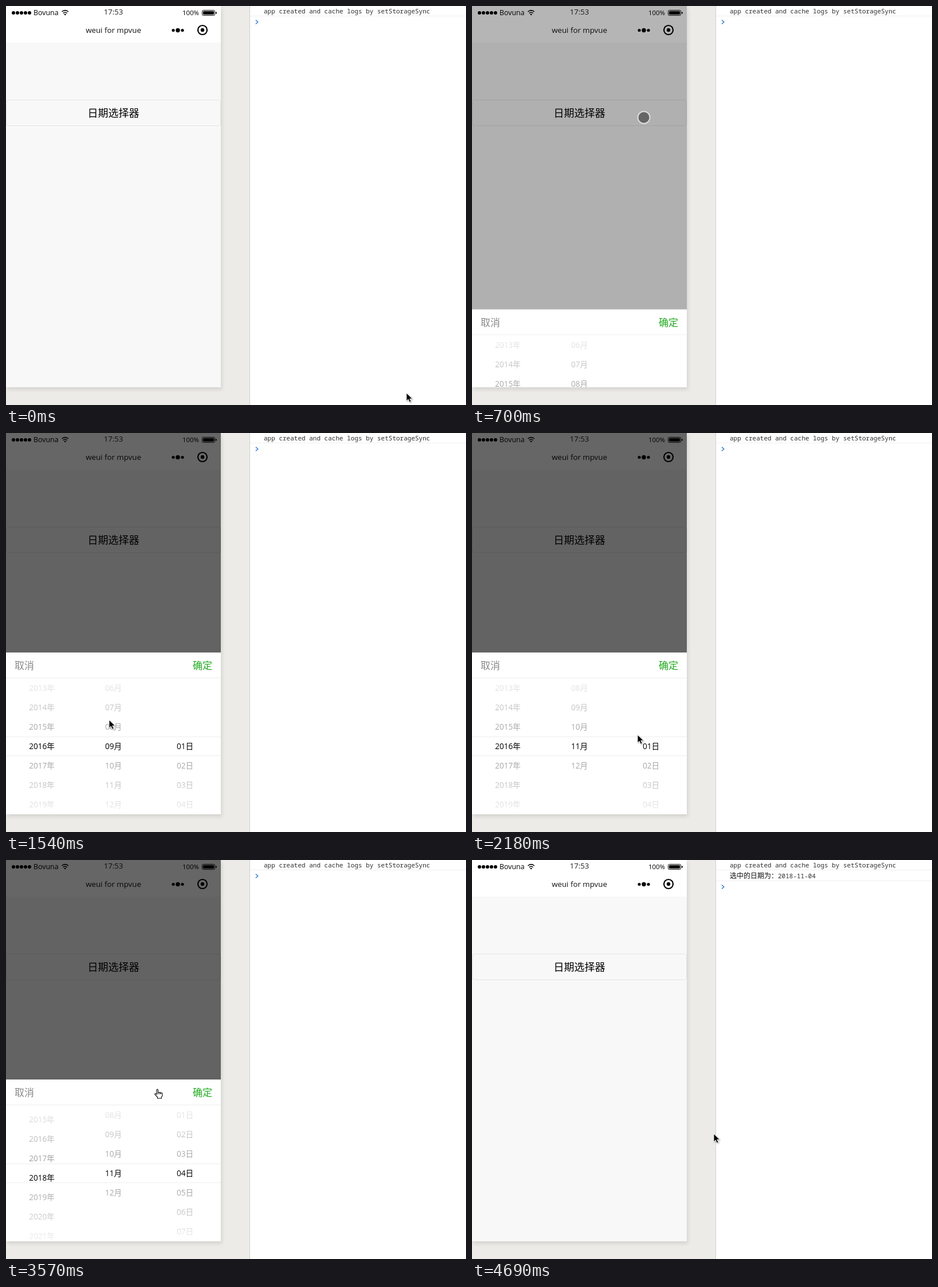
Recreate the animation shown at these times as an HTML page. Size 803x698 px, loop 4.76 s.

```html
<!DOCTYPE html>
<html lang="zh-CN">
<head>
<meta charset="utf-8">
<title>Date picker</title>
<style>
  html, body { margin: 0; width: 100%; height: 100%; overflow: hidden; background: #ecebe7; }
  svg { display: block; font-family: "Open Sans", "Noto Sans CJK SC", "Noto Sans CJK", sans-serif; }
  .mid { text-anchor: middle; }
  .log { font: 11px "Noto Sans Mono", "DejaVu Sans Mono", monospace; fill: #303030; }
  .cjk { font: 12px "Noto Sans CJK SC", "Noto Sans CJK", sans-serif; fill: #111; }
  .line { stroke: #eee; }
  #shadow { filter: drop-shadow(2px 4px 3px rgba(0, 0, 0, .1)); }
  #arrow { filter: drop-shadow(1px 1px 1px rgba(0, 0, 0, .35)); }
</style>
</head>
<body>
<svg width="803" height="698" viewBox="0 0 803 698">
  <defs>
    <clipPath id="screen"><path d="M0 0h375v667H0z"/></clipPath>
    <clipPath id="wheel"><path d="M0 429h375v238H0z"/></clipPath>
    <linearGradient id="fadeTop" x2="0" y2="1">
      <stop stop-color="#fff" stop-opacity=".95"/><stop offset="1" stop-color="#fff" stop-opacity=".6"/>
    </linearGradient>
    <linearGradient id="fadeEnd" x2="0" y2="1">
      <stop stop-color="#fff" stop-opacity=".6"/><stop offset="1" stop-color="#fff" stop-opacity=".95"/>
    </linearGradient>
  </defs>

  <!-- console -->
  <path d="M426 0h377v698H426z" fill="#fff"/>
  <path d="M425.5 0v698" stroke="#d0d0d0"/>
  <path d="M426 17.5h377" stroke="#f0f0f0"/>
  <text class="log" x="450" y="13">app created and cache logs by setStorageSync</text>
  <g id="result">
    <text class="cjk" x="450" y="32">选中的日期为：</text>
    <text class="log" x="534" y="32">2018-11-04</text>
    <path d="M426 36.5h377" stroke="#f0f0f0"/>
  </g>
  <path id="prompt" d="M436 24.5l3.7 3.5-3.7 3.5" fill="none" stroke="#3b82f0" stroke-width="1.6"/>

  <!-- phone -->
  <path id="shadow" d="M0 0h375v667H0z" fill="#f8f8f8"/>
  <g clip-path="url(#screen)">
    <path d="M0 0h375v64H0z" fill="#fff"/>
    <path d="M13 12h28.1" stroke="#000" stroke-width="6" stroke-linecap="round" stroke-dasharray="0 7"/>
    <text x="48" y="15.5" font-size="12.4">Bovuna</text>
    <path d="M97.5 10q5.7-4.6 11.4 0M99.7 12.7q3.5-2.8 7 0" fill="none" stroke="#000" stroke-width="1.6"/>
    <path d="M101.2 14.4q2-1.4 4 0l-2 2.2z"/>
    <text class="mid" x="187.5" y="15" font-size="13.2" fill="#222">17:53</text>
    <text x="308" y="16" font-size="11.4">100%</text>
    <rect x="342.5" y="7.5" width="22" height="9" rx="2" fill="none" stroke="#000"/>
    <rect x="344" y="9" width="19" height="6" rx="1"/>
    <path d="M366 10q2 .3 2 2t-2 2z"/>
    <text class="mid" x="187.5" y="47" font-size="13.3" fill="#111">weui for mpvue</text>
    <circle cx="292" cy="42.5" r="2.6"/><circle cx="300" cy="42.5" r="3.7"/><circle cx="308" cy="42.5" r="2.6"/>
    <circle cx="343" cy="42" r="8" fill="none" stroke="#000" stroke-width="2.2"/>
    <circle cx="343" cy="42" r="3.2"/>
    <rect id="button" x=".5" y="164.5" width="374" height="45" rx="4" stroke="#e4e4e4"/>
    <text class="mid" x="187.5" y="194" font-size="18">日期选择器</text>

    <path id="dim" d="M0 0h375v667H0z"/>
    <g id="sheet">
      <path d="M0 384h375v283H0z" fill="#fff"/>
      <text x="15" y="413" font-size="17" fill="#888">取消</text>
      <text x="326" y="413" font-size="17" fill="#1aad19">确定</text>
      <g id="columns" class="mid" font-size="13.6" clip-path="url(#wheel)"></g>
      <rect y="429" width="375" height="102" fill="url(#fadeTop)"/>
      <rect y="565" width="375" height="102" fill="url(#fadeEnd)"/>
      <path class="line" d="M0 428.5h375M0 531.5h375M0 564.5h375"/>
    </g>
  </g>

  <g id="cursor">
    <path id="arrow" d="M0 0v14l3.2-3 2.3 5.2 2.6-1.1-2.3-5h4.6z" stroke="#fff" stroke-width=".9"/>
    <g id="hand" fill="#fff" stroke="#000" stroke-width="1.1">
      <path d="M4 10V2.2c0-1.6 2.4-1.6 2.4 0V7c.2-1 2.3-1 2.5.2.3-.9 2.2-.7 2.4.5.4-.8 2.7-.5 2.7 1v3.5L12.3 15v2H5.5v-2L1 10.2c-.8-1.2.8-2.2 1.7-1.3z"/>
      <path d="M6.4 7v2.5M8.9 7.2v2.5M11.3 7.7v2"/>
    </g>
    <circle id="touch" r="10.5" fill="#666" stroke="#ddd" stroke-width="2"/>
  </g>
</svg>
<script>
// All times below count screen refreshes of 78 ms.
const REFRESH = 78, COUNT = 61, ROW = 34;
const $ = id => document.getElementById(id);
const show = (id, on) => $(id).setAttribute('display', on ? 'inline' : 'none');
const move = (el, x, y) => el.setAttribute('transform', `translate(${x} ${y})`);

// Sine ease from 0 to 1 between two times
const ease = (t, from, to) =>
  (1 - Math.cos(Math.PI * Math.min(1, Math.max(0, (t - from) / (to - from))))) / 2;

// Each wheel is dragged upwards from its start time by a number of rows
const wheels = [
  { x: 62.5, first: 2010, last: 2026, chosen: 2016, unit: '年', start: 42.1, rows: 2 },
  { x: 187.5, first: 1, last: 12, chosen: 9, unit: '月', start: 22, rows: 2 },
  { x: 312.5, first: 1, last: 31, chosen: 1, unit: '日', start: 30.9, rows: 3 }
];
for (const w of wheels) {
  w.release = w.start + 1.2 * w.rows;
  w.settle = w.start + 2 * w.rows + 1;
  w.el = document.createElementNS('http://www.w3.org/2000/svg', 'g');
  for (let n = w.first; n <= w.last; n++) {
    const text = document.createElementNS(w.el.namespaceURI, 'text');
    text.setAttribute('x', w.x);
    text.setAttribute('y', 553 + (n - w.chosen) * ROW);
    text.textContent = String(n).padStart(2, '0') + w.unit;
    w.el.append(text);
  }
  $('columns').append(w.el);
}

const taps = [
  { x: 300, y: 195, start: 7, release: 9 },
  { x: 362, y: 420, start: 55, release: 58 }
];
const presses = [...taps, ...wheels];

// Pointer stops [time, x, y]: free moves, then taps and drags
const stops = [
  [0, 699, 677], [11, 340, 269], [14, 331, 422], [20, 180, 502], [28, 289, 528],
  [36, 311, 378], [46, 259, 400], [49, 323, 398], [52, 369, 411], [60, 422, 479],
  ...taps.flatMap(p => [[p.start, p.x, p.y], [p.release, p.x, p.y]]),
  ...wheels.flatMap(w => [[w.start, w.x, 508], [w.release, w.x, 397]])
].sort((a, b) => a[0] - b[0]);

function pointer(t) {
  const i = Math.max(1, stops.findIndex(s => s[0] >= t));
  const [from, x0, y0] = stops[i - 1], [to, x1, y1] = stops[i];
  const u = ease(t, from, to);
  return [x0 + (x1 - x0) * u, y0 + (y1 - y0) * u];
}

function draw(now) {
  const t = Math.min(COUNT - 1, Math.floor(now % (REFRESH * COUNT + 2) / REFRESH + .35));
  const open = ease(t, 6.9, 11.2) - ease(t, 57.5, 60);
  const done = t >= 58;
  const [x, y] = pointer(t);
  const touch = presses.some(p => t >= p.start && t <= p.release);
  const hand = !touch && open > .5 && x < 375 && y > 384 && y < 429;

  $('button').setAttribute('fill', t >= 7 && t < 9 ? '#dedede' : '#f8f8f8');
  $('dim').setAttribute('fill-opacity', .6 * open);
  show('sheet', open > 0);
  move($('sheet'), 0, 283 * (1 - open));
  for (const w of wheels) move(w.el, 0, -w.rows * ROW * ease(t, w.start, w.settle));

  show('result', done);
  move($('prompt'), 0, done ? 19 : 0);
  show('touch', touch);
  show('hand', hand);
  show('arrow', !touch && !hand);
  move($('cursor'), x, y);
  requestAnimationFrame(draw);
}
draw(0);
</script>
</body>
</html>
```
